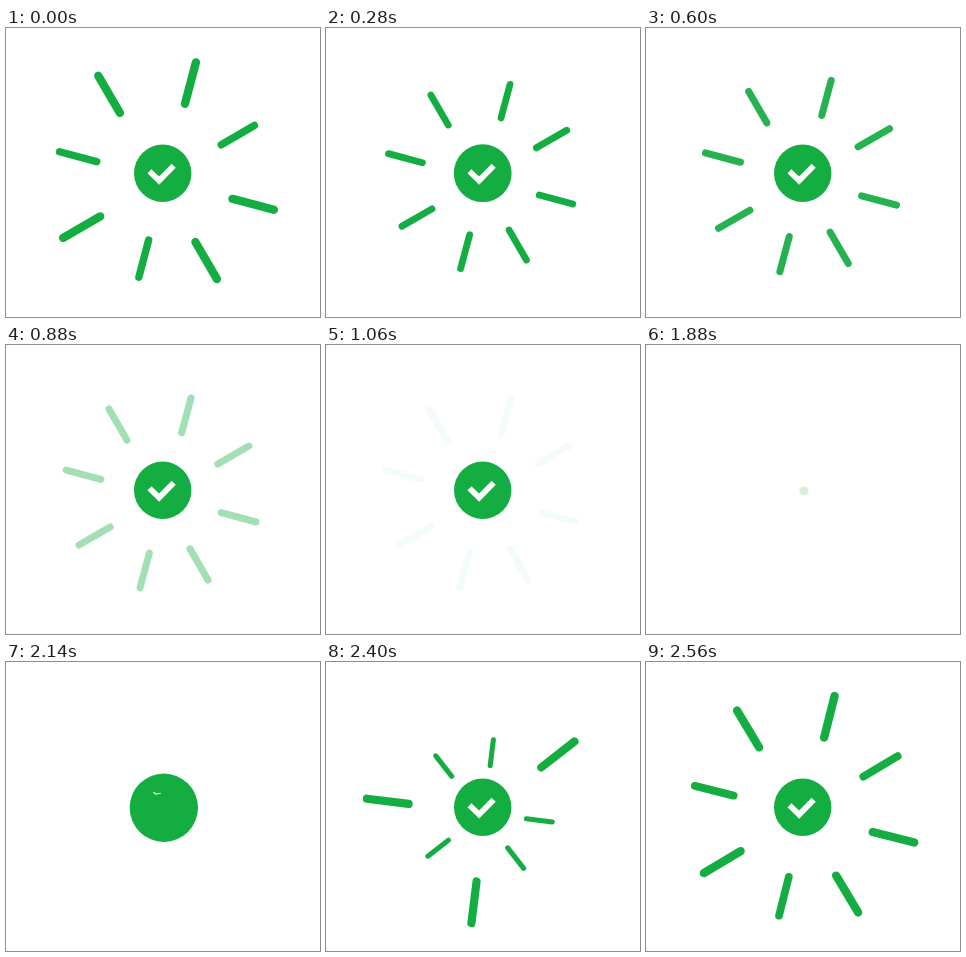
Animation, 314 px wide and 289 px high, one loop 2.6 s. Source, as an HTML page:

```html
<!DOCTYPE html>
<html lang="en">
<head>
<meta charset="utf-8">
<title>Success burst</title>
<style>
  html, body { margin: 0; width: 100%; height: 100%; overflow: hidden; background: #fff; }
  svg { display: block; width: 100vw; height: 100vh; }
  #rays { stroke: #14ad41; stroke-width: 7; stroke-linecap: round; }
  #disc { fill: #14ad41; }
  #tick { fill: none; stroke: #fff; stroke-width: 5.7; }
</style>
</head>
<body>
<svg viewBox="0 0 314 289">
  <g id="rays"></g>
  <g id="badge">
    <circle id="disc" r="28.7"/>
    <path id="tick" d="M-12 -2L-2.4 7.4L12.2 -7.5"/>
  </g>
</svg>
<script>
const LOOP = 2600;
const EARLY = 2110, LATE = 2240, SPIN_END = 2640;
const BADGE_IN = 1820, BADGE_SHOWN = 1880, TICK_IN = 2136;
const LENGTH = 36;

// tip x, tip y, direction in degrees, start time
const RAYS = [
  [185, 53, 75, LATE],
  [243, 101, 30, EARLY],
  [250, 177, -15, LATE],
  [202, 235, -60, LATE],
  [134, 243, -105, EARLY],
  [73, 200, -150, LATE],
  [60, 125, 165, EARLY],
  [103, 64, 120, LATE]
];

const $ = id => document.getElementById(id);
const rays = $('rays'), badge = $('badge'), disc = $('disc'), tick = $('tick');
const clamp = (v, lo = 0, hi = 1) => Math.min(hi, Math.max(lo, v));
const mix = (a, b, p) => a + (b - a) * p;

// Underdamped spring from 0 to 1, first peak after 340 ms
function spring(ms) {
  if (ms <= 0) return 0;
  const w = Math.PI / 340, k = 0.0048;
  return 1 - Math.exp(-k * ms) * (Math.cos(w * ms) + k / w * Math.sin(w * ms));
}

const lines = RAYS.map(([x, y, deg, start]) => {
  const a = deg * Math.PI / 180;
  const el = document.createElementNS('http://www.w3.org/2000/svg', 'line');
  const ends = { x1: x, y1: y, x2: x - LENGTH * Math.cos(a), y2: y + LENGTH * Math.sin(a) };
  for (const key in ends) el.setAttribute(key, ends[key]);
  rays.append(el);
  return { el, start };
});

function drawRays(t) {
  const time = t < 1100 ? t + LOOP : t;
  const left = 1 - clamp((time - EARLY) / (SPIN_END - EARLY));
  rays.setAttribute('transform', `rotate(${-39 * left * left} 157 150)`);
  rays.setAttribute('opacity', t < 1100 ? clamp((1085 - t) / 525) : 1);
  for (const { el, start } of lines) {
    const s = spring(time - start);
    el.setAttribute('visibility', s > 0 ? 'visible' : 'hidden');
    el.setAttribute('transform', `translate(157 150) scale(${s}) translate(-157 -150)`);
  }
}

function drawBadge(t) {
  const time = t < BADGE_SHOWN ? t + LOOP : t;
  const age = time - BADGE_IN;
  const u = clamp((time - TICK_IN) / 300);
  const p = 1 - (1 - u) ** 3;

  // The disc overshoots once, then settles without dipping
  let s = spring(age);
  if (age > 340) s = Math.max(1, s);
  const fade = t < BADGE_SHOWN ? clamp((1243 - t) / 133, 0.025) : clamp(s);
  badge.setAttribute('opacity', fade);
  disc.setAttribute('transform',
    `translate(${mix(157.9, 156.7, p)} ${mix(145.8, 145.2, p)}) scale(${s})`);

  tick.setAttribute('visibility', u > 0 ? 'visible' : 'hidden');
  tick.setAttribute('transform',
    `translate(${mix(150.6, 155.5, p)} ${mix(130.6, 145.2, p)}) ` +
    `rotate(${mix(14, 0, p)}) scale(${mix(0.27, 1, p)} ${mix(0.1, 1, p)})`);
}

const origin = performance.now();
function frame() {
  const t = (performance.now() - origin) % LOOP;
  drawRays(t);
  drawBadge(t);
  requestAnimationFrame(frame);
}
frame();
</script>
</body>
</html>
```
